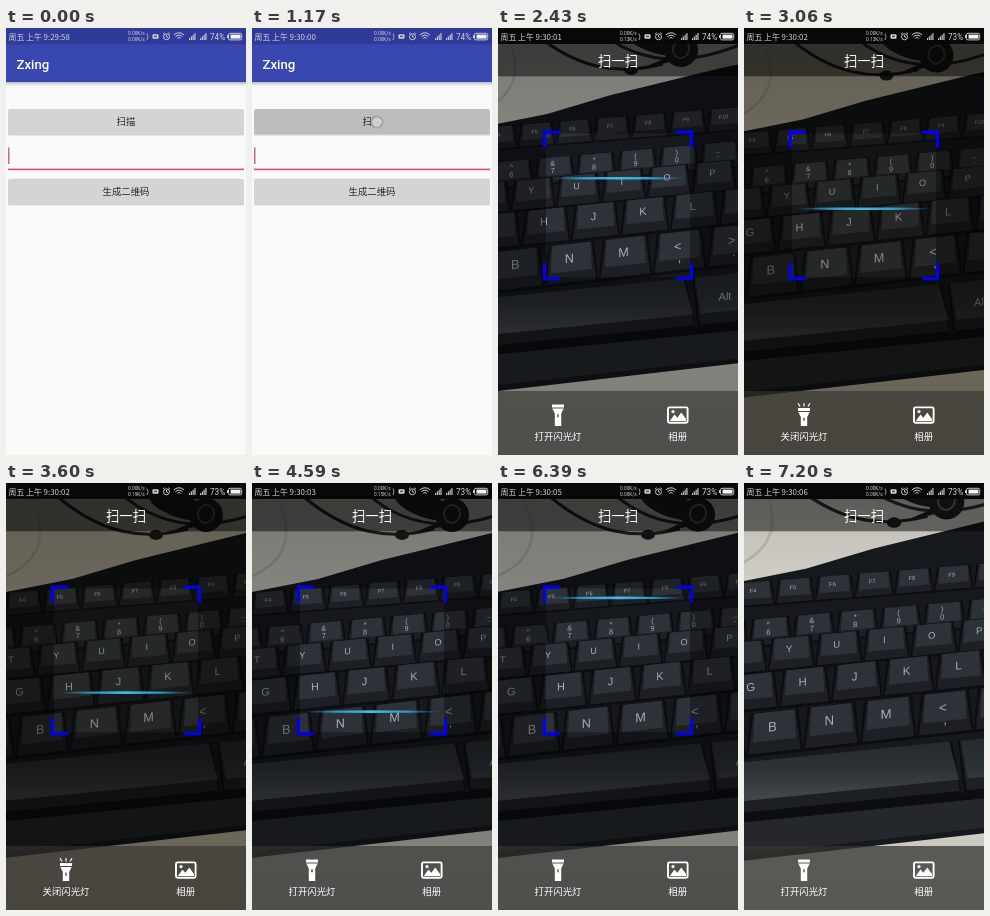
An HTML page with a canvas for the animation above (7290 ms loop, 240 by 427 pixels).

```html
<!DOCTYPE html>
<html lang="zh-CN">
<head>
<meta charset="utf-8">
<title>Zxing</title>
<style>
html, body { margin: 0; width: 100%; height: 100%; overflow: hidden; background: #f9f9f9; }
canvas { display: block; width: 100vw; height: 100vh; }
</style>
</head>
<body>
<canvas id="stage"></canvas>
<script>
const W = 240, H = 427, LOOP = 7290, STEP = 90;
const CJK = '"Noto Sans CJK SC", "Noto Sans CJK", "Noto Sans CJK JP", sans-serif';
const LATIN = 'Roboto, "Noto Sans", sans-serif';
const KEYFONT = '"Liberation Sans", Arial, sans-serif';

// Moments of the story, in ms
const PRESS = 1080, ENTER = 1530, PREVIEW = 1890, FINDER_END = 6930;
const TOGGLES = [3060, 4050, 5040, 5760];

const canvas = document.getElementById('stage');
const ctx = canvas.getContext('2d');

// ---------- helpers ----------
const clamp = v => Math.max(0, Math.min(1, v));
const ease = v => (1 - Math.cos(Math.PI * clamp(v))) / 2;
const within = (t, from, length) => t >= from && t < from + length;

function rect(x, y, w, h, color) {
  ctx.fillStyle = color;
  ctx.fillRect(x, y, w, h);
}

function shape(color, draw) {
  ctx.fillStyle = color;
  ctx.beginPath();
  draw();
  ctx.fill();
}

function stroke(color, width, draw) {
  ctx.strokeStyle = color;
  ctx.lineWidth = width;
  ctx.beginPath();
  draw();
  ctx.stroke();
}

const round = (x, y, w, h, r, color) => shape(color, () => ctx.roundRect(x, y, w, h, r));
const disc = (x, y, r, color) => shape(color, () => ctx.arc(x, y, r, 0, 7));

function poly(color, ...p) {
  shape(color, () => {
    for (let i = 0; i < p.length; i += 2) ctx.lineTo(p[i], p[i + 1]);
  });
}

function text(s, x, y, font, color, align = 'center') {
  ctx.font = font;
  ctx.fillStyle = color;
  ctx.textAlign = align;
  ctx.fillText(s, x, y);
}

function gradient(x0, y0, x1, y1, ...colors) {
  const g = ctx.createLinearGradient(x0, y0, x1, y1);
  colors.forEach((c, i) => g.addColorStop(i / (colors.length - 1), c));
  return g;
}

function touch(x, y) {
  disc(x, y, 6.5, 'rgba(150,150,145,.6)');
  disc(x, y, 4.8, 'rgba(225,225,220,.8)');
}

// ---------- status bar ----------
function clock(t) {
  const s = 58 + Math.floor(t < 1620 ? (t + 630) / 720 : 3 + (t - 1620) / 1030);
  return `9:${29 + Math.floor(s / 60)}:${String(s % 60).padStart(2, '0')}`;
}

function speed(t) {
  const rates = ['0.00', '0.12', '0.13', '0.19', '0.15', '0.00'];
  return rates[Math.max(0, Math.min(5, Math.floor((t - 270) / 990)))] + 'K/s';
}

function signal(x, ink) {
  for (let i = 0; i < 4; i++) rect(x + i * 1.8, 10.2 - i * 1.7, 1.1, 1.8 + i * 1.7, ink);
}

function statusBar(t) {
  const ink = '#d4d4da';
  rect(0, 0, W, 16.3, t < ENTER ? '#2f3a99' : t < PREVIEW ? '#192152' : '#080808');
  text('周五 上午 ' + clock(t), 2.5, 11.6, '7.9px ' + CJK, ink, 'left');
  text('0.00K/s', 122, 7.2, '4.8px ' + LATIN, ink, 'left');
  text(speed(t), 122, 13.2, '4.8px ' + LATIN, ink, 'left');
  stroke(ink, .7, () => { ctx.moveTo(141, 5.5); ctx.quadraticCurveTo(143, 8.5, 141, 12); });
  round(146.5, 6.3, 6, 4.4, 1, ink);
  rect(148, 7.6, 3, 1.6, '#555');
  stroke(ink, .9, () => {
    ctx.arc(160.5, 8.8, 3, 0, 7);
    ctx.moveTo(160.5, 7); ctx.lineTo(160.5, 9); ctx.lineTo(162, 9.6);
    ctx.moveTo(157, 6.2); ctx.lineTo(158.7, 4.7);
    ctx.moveTo(162.3, 4.7); ctx.lineTo(164, 6.2);
  });
  for (let r = 2.4; r < 8; r += 2.4)
    stroke(ink, 1, () => ctx.arc(173, 12, r, -Math.PI * .76, -Math.PI * .24));
  signal(183, ink);
  signal(194, ink);
  text(t < 2790 ? '74%' : '73%', 204, 11.7, '8.2px ' + LATIN, ink, 'left');
  stroke(ink, .9, () => ctx.roundRect(222.5, 5.3, 13.2, 6.6, 1.5));
  rect(221, 7.2, 1.3, 2.8, ink);
  rect(224.5, 6.6, 10, 4, '#f4f4f4');
}

// ---------- first screen ----------
function button(y, label, pressed) {
  round(2, y + 1, 236, 25.6, 1.5, 'rgba(0,0,0,.16)');
  round(2.3, y, 235.4, 25.3, 1.5, pressed ? '#bdbdbd' : '#d4d4d4');
  text(label, 120, y + 16.3, '500 9.4px ' + CJK, '#262626');
}

function mainScreen(t) {
  rect(0, 0, W, H, '#f9f9f9');
  ctx.fillStyle = gradient(0, 54, 0, 58, 'rgba(0,0,0,.25)', 'rgba(0,0,0,0)');
  ctx.fillRect(0, 54, W, 4);
  rect(0, 16, W, 38, '#3948b0');
  text('Zxing', 10.5, 40.7, '500 13.2px ' + LATIN, '#fff', 'left');
  button(81, '扫描', within(t, PRESS, 270));
  button(150.7, '生成二维码', false);
  rect(2, 140.6, 236, 1.6, '#e2487a');
  if (!within(t, 450, 540)) rect(2.2, 119.5, 1.2, 16.5, '#c2436f');
  if (within(t, PRESS, 180)) touch(125, 94);
}

// ---------- camera picture ----------
// Legends, x of the first one, y of the row at the left edge
const ROWS = [
  [['F3', 'F4', 'F5', 'F6', 'F7', 'F8', 'F9', 'F10'], -22, 118],
  [[...'567890-'], -11, 155],
  [[...'TYUIOP'], 5, 177],
  [[...'FGHJKL;'], -36, 210],
  [[...'VBNM<>'], -20, 250]
];
const SHIFTED = { 5: '%', 6: '^', 7: '&', 8: '*', 9: '(', 0: ')', '-': '_' };
const BELOW = { '<': ',', '>': '.' };
const LEGEND = '#a9aeb2', FACE = '#2d3238', SKIRT = '#1c1f24', GAP = '#0c0d10';

function keyCap(x, w, h) {
  const side = (color, top, bottom, a, b) =>
    poly(color, x - w * a, h * top, x + w * a, h * top, x + w * b, h * bottom, x - w * b, h * bottom);
  side(GAP, -.4, .74, .42, .5);
  side(SKIRT, -.38, .66, .37, .46);
  side(FACE, -.38, .36, .35, .38);
}

function keyRow([legends, x0, y0], r) {
  const pitch = 37.8 * 1.094 ** r, cap = 21 * 1.15 ** r;
  const size = 5.5 + 1.8 * r, font = size + 'px ' + KEYFONT;
  ctx.save();
  ctx.transform(1, -.08 - .008 * r, 0, 1, 0, y0);
  legends.forEach((s, i) => {
    const x = x0 + i * pitch, upper = SHIFTED[s], lower = BELOW[s];
    keyCap(x + 2, pitch, cap);
    text(s, x, upper ? 6.5 : size * .36, font, LEGEND);
    if (upper) text(upper, x, -1, font, LEGEND);
    if (lower) text(lower, x + 2, 16, font, LEGEND);
  });
  ctx.restore();
}

function desk() {
  rect(-80, -40, W + 160, H + 120, gradient(0, 0, 0, H, '#b9b7b0', '#d6d4cb', '#d2d0c7', '#c4c2b9'));
  stroke('#b0afa8', 2.5, () => { ctx.moveTo(14, 0); ctx.bezierCurveTo(46, 42, 42, 80, -12, 98); });
  stroke('#25262a', 3, () => { ctx.moveTo(52, 14); ctx.bezierCurveTo(95, 50, 135, 58, 182, 46); });
  stroke('#2c2d31', 3, () => { ctx.moveTo(112, 8); ctx.bezierCurveTo(140, 34, 188, 60, 270, 22); });
  shape('#1e1f23', () => {
    ctx.ellipse(172, 22, 31, 12, .35, 0, 7);
    ctx.ellipse(200, 32, 17, 17, .3, 0, 7);
    ctx.ellipse(150, 52, 7, 5, 0, 0, 7);
  });
  stroke('#65666a', 2, () => ctx.ellipse(200, 31, 8, 9, .3, 0, 7));
}

// Wide key with a lighter top that catches the light
function wideKey(x0, x1, label) {
  const edge = x => 281 - .1 * x;
  const slab = (color, dx, h) => poly(color, x0 + 2 - dx, edge(x0), x1 - 2 + dx, edge(x1),
    x1 + 8 + dx, edge(x1) + h, x0 + 8 - dx, edge(x0) + h);
  slab(GAP, 3, 53);
  slab(SKIRT, 1, 47);
  slab(gradient(0, 262, 0, 312, '#262b30', '#2d3237', '#41464b'), 0, 36);
  if (!label) return;
  ctx.save();
  ctx.transform(1, -.1, 0, 1, x0 + 32, 278);
  text(label, 0, 4, '11px ' + KEYFONT, LEGEND);
  ctx.restore();
}

function keyboard() {
  poly('#15181c', -80, 120, 0, 109, 66, 96, 130, 77, 240, 50, 330, 32, 330, 337, -80, 384);
  poly('#24282d', -80, 346, 330, 305, 330, 332, -80, 378);
  poly(GAP, -80, 340, 330, 299, 330, 305, -80, 346);
  ROWS.forEach(keyRow);
  wideKey(-90, 204);
  wideKey(212, 330, 'Alt');
}

function camera(t, lit) {
  const drift = 1 - ease((t - 2430) / 1170), zoom = ease((t - 6300) / 900);
  ctx.save();
  ctx.translate(-17 * drift - 7.5 * zoom, -10 * drift - 15 * zoom);
  ctx.scale(1 + .05 * zoom, 1 + .05 * zoom);
  desk();
  keyboard();
  ctx.restore();
  if (!lit) return;
  ctx.globalCompositeOperation = 'multiply';
  rect(0, 0, W, H, '#cfcab8');
  ctx.globalCompositeOperation = 'source-over';
}

// ---------- scan screen ----------
const BOX = { x: 48, y: 105.6, w: 144, h: 143.6 };

// Down and up again, a little faster each time
function lineY(t) {
  const s = (t - 1710) / 1000;
  const phase = Math.max(0, .1 + .27 * s + .032 * s * Math.abs(s)) % 2;
  return BOX.y + BOX.h * (1 - Math.abs(1 - phase));
}

function finder(t) {
  const { x, y, w, h } = BOX, arm = 17, th = 3, blue = '#0000fa';
  ctx.fillStyle = 'rgba(0,0,0,.36)';
  ctx.beginPath();
  ctx.rect(0, 16.3, W, H);
  ctx.rect(x, y, w, h);
  ctx.fill('evenodd');

  for (const [cx, dx] of [[x - th, 1], [x + w + th, -1]])
    for (const [cy, dy] of [[y - th, 1], [y + h + th, -1]]) {
      rect(cx, cy, arm * dx, th * dy, blue);
      rect(cx, cy, th * dx, arm * dy, blue);
    }

  const clear = 'rgba(45,175,225,0)', glow = 'rgba(45,175,225,.85)';
  shape(gradient(x + 4, 0, x + w - 4, 0, clear, glow, '#41bce6', glow, clear),
    () => ctx.ellipse(120, lineY(t), 70, 1.3, 0, 0, 7));
}

function torch(lit) {
  const top = lit ? 380 : 376.5;
  rect(54, top, 12, 3, '#fff');
  poly('#fff', 54.3, top + 4, 65.7, top + 4, 63.2, top + 9, 63.2, 398, 56.8, 398, 56.8, top + 9);
  round(59.2, top + 9.5, 1.6, 3.6, .8, '#666');
  if (lit) stroke('#fff', 1.2, () => {
    for (const d of [-1, 0, 1]) {
      ctx.moveTo(60 + d * 4, 378.5);
      ctx.lineTo(60 + d * 6, 375.2);
    }
  });
}

function album() {
  stroke('#fff', 1.9, () => ctx.roundRect(170, 379.4, 19.6, 15.4, 1.5));
  poly('#fff', 171.8, 393, 176.5, 386.5, 179.3, 389.8, 183.3, 384.5, 188, 391, 188, 393);
  disc(175, 383.6, 1.6, '#fff');
}

function scanScreen(t) {
  const slide = 26 * (1 - clamp((t - ENTER) / 360)) ** 2;
  const fade = clamp((t - ENTER + 45) / 200);
  const lit = TOGGLES.filter(at => at <= t).length % 2 === 1;
  const framed = t < FINDER_END;
  if (t >= PREVIEW) camera(t, lit);
  else rect(0, 0, W, H, `rgba(0,0,0,${.13 * fade})`);

  ctx.save();
  ctx.globalAlpha = fade;
  ctx.translate(0, slide);
  if (framed) finder(t);
  rect(0, 16.3, W, 32, 'rgba(0,0,0,.5)');
  rect(0, 363, W, 64, `rgba(54,53,49,${framed ? .63 : .75})`);
  text('扫一扫', 120, 38, '13.4px ' + CJK, '#fff');
  torch(lit);
  album();
  text(lit ? '关闭闪光灯' : '打开闪光灯', 60, 411.8, '9.4px ' + CJK, '#fff');
  text('相册', 179.7, 411.8, '9.4px ' + CJK, '#fff');
  if (TOGGLES.some(at => within(t, at - 90, 90))) touch(71, 389);
  ctx.restore();
}

// ---------- loop ----------
function render(t) {
  const d = devicePixelRatio || 1;
  const pw = Math.round(innerWidth * d), ph = Math.round(innerHeight * d);
  if (canvas.width !== pw || canvas.height !== ph) {
    canvas.width = pw;
    canvas.height = ph;
  }
  ctx.setTransform(pw / W, 0, 0, ph / H, 0, 0);
  if (t < PREVIEW) mainScreen(t);
  if (t >= ENTER) scanScreen(t);
  statusBar(t);
}

const start = performance.now();
function tick() {
  const t = (performance.now() - start) % LOOP;
  render(Math.floor(t / STEP) * STEP);
  requestAnimationFrame(tick);
}
tick();
</script>
</body>
</html>
```
